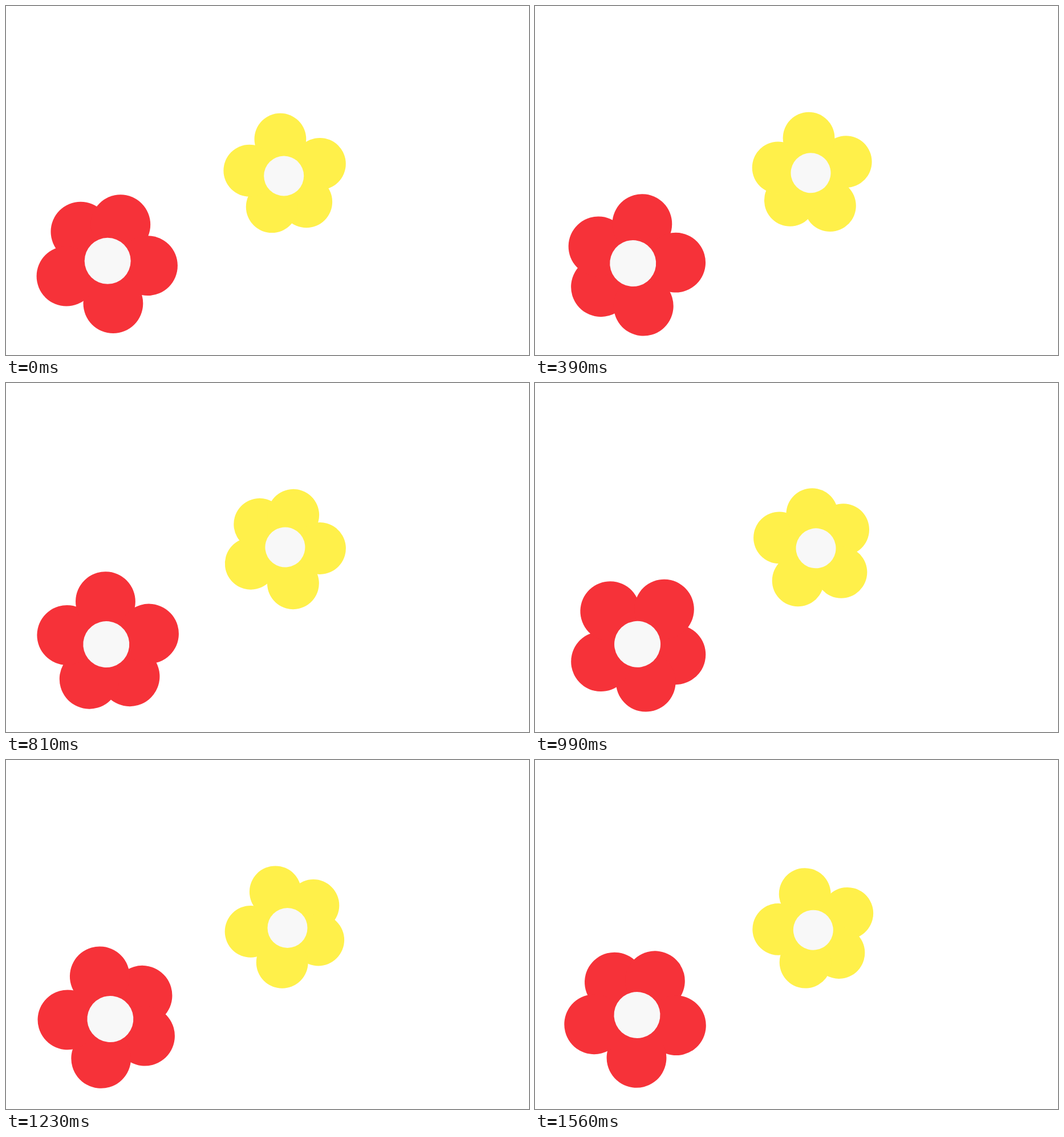
An HTML page that plays this animation: 917 by 611 pixels, repeating every 1.59 s.

```html
<!DOCTYPE html>
<html lang="en">
<head>
<meta charset="utf-8">
<title>Turning flowers</title>
<style>
  html, body { margin: 0; height: 100%; overflow: hidden; background: #fff; }
  svg { display: block; width: 100vw; height: 100vh; }
</style>
</head>
<body>
<svg viewBox="0 0 917 611"></svg>
<script>
const STEP = 30, STEPS = 53;
const svg = document.querySelector('svg');

// stops: the steps at which each quarter turn is complete
const flowers = [
  {
    x: 177.3, y: 452, direction: -1, color: '#f63239', stops: [0, 14, 28, 42, 53],
    petalRadius: 52.4, petals: [[-46.4, -56.9], [23.5, -69.3], [71.2, 2.6], [10.6, 68.6], [-71.3, 21.1]],
    heartRadius: 40.5, heart: [0.9, -5.7]
  },
  {
    x: 488.6, y: 292.6, direction: 1, color: '#fff04a', stops: [0, 15, 28, 41, 53],
    petalRadius: 45.4, petals: [[-7.7, -59.5], [61.8, -16.3], [38.1, 50.3], [-22.4, 59.1], [-61.8, -4.4]],
    heartRadius: 35, heart: [-1.4, 4.9]
  }
];

const circle = ([x, y], r, fill) => `<circle cx="${x}" cy="${y}" r="${r}" fill="${fill}"/>`;

for (const f of flowers) {
  f.node = document.createElementNS('http://www.w3.org/2000/svg', 'g');
  f.node.innerHTML = f.petals.map(p => circle(p, f.petalRadius, f.color)).join('') +
    circle(f.heart, f.heartRadius, '#f8f8f8');
  svg.append(f.node);
}

function angleAt(stops, step) {
  const i = stops.findIndex(s => s > step) - 1;
  return 90 * (i + (step - stops[i]) / (stops[i + 1] - stops[i]));
}

function draw() {
  const step = Math.floor(performance.now() / STEP) % STEPS;
  for (const f of flowers) {
    const angle = f.direction * angleAt(f.stops, step);
    f.node.setAttribute('transform', `translate(${f.x} ${f.y}) rotate(${angle})`);
  }
  requestAnimationFrame(draw);
}
draw();
</script>
</body>
</html>
```
